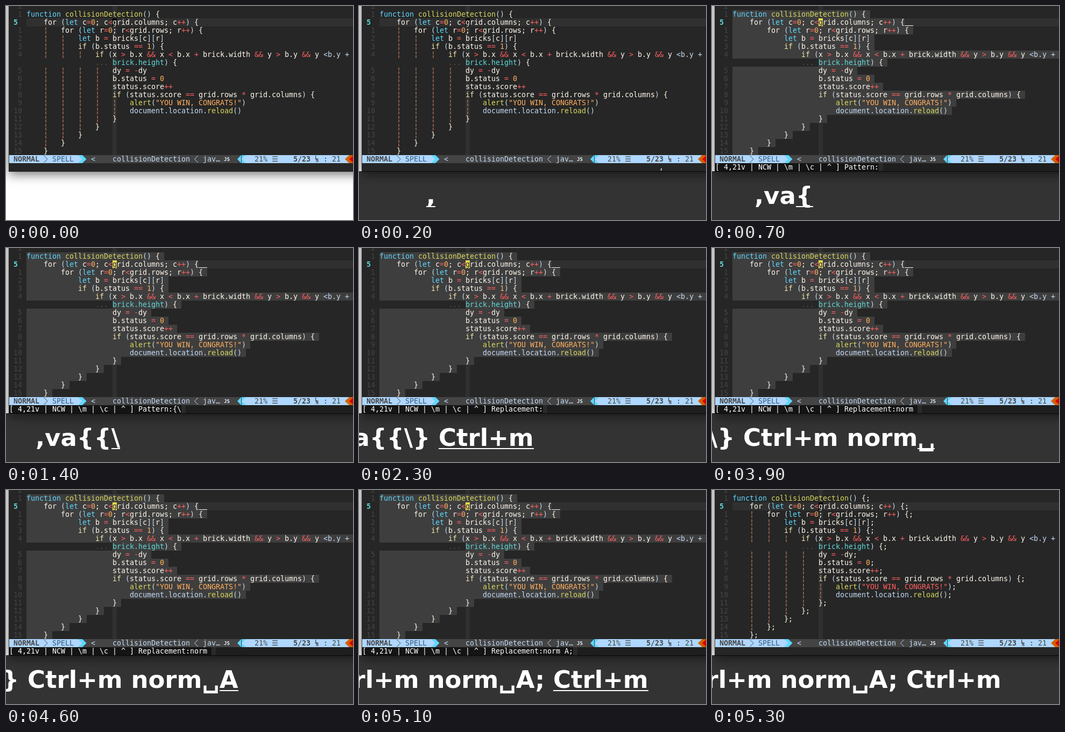
Animation, 645 px wide and 399 px high, one loop 6.5 s. Source, as an HTML page with a canvas:

```html
<!DOCTYPE html>
<html lang="en">
<head>
<meta charset="utf-8">
<title>Editing several lines at once</title>
<style>
html, body { margin: 0; width: 645px; height: 399px; overflow: hidden; background: #fff; }
canvas { display: block; }
</style>
</head>
<body>
<canvas id="stage" width="645" height="399"></canvas>
<script>
const ctx = document.getElementById('stage').getContext('2d');
const W = 645, H = 399, LOOP = 6500;
const CELL = 8, ROW = 15, LEFT = 6, TOP = 8, CODE = 38;
const MONO = '"DejaVu Sans Mono", monospace';
const FONT = '13.33px ' + MONO;
const BOLD = 'bold ' + FONT;
const KEYS = 'bold 45px "DejaVu Sans", sans-serif';

const C = {
  bg: '#262626', line: '#303030', sel: '#3e3e3e', num: '#444444', text: '#fff8ec',
  red: '#ff5f5f', orange: '#ffaf5f', cyan: '#5fd7ff', teal: '#5fd7d7', lime: '#d7d75f',
  pale: '#afd7ff', bar: '#d7875f', yellow: '#e8d84a', mid: '#444444', info: '#c2daf4',
  hot: '#d75f00', alarm: '#d70000'
};

// [number, indent, code]
const lines = [
  ['1', 0, 'function collisionDetection() {'],
  ['5', 4, 'for (let c=0; c<grid.columns; c++) {'],
  ['1', 8, 'for (let r=0; r<grid.rows; r++) {'],
  ['2', 12, 'let b = bricks[c][r]'],
  ['3', 12, 'if (b.status == 1) {'],
  ['4', 16, 'if (x > b.x && x < b.x + brick.width && y > b.y && y <b.y + '],
  ['', 20, 'brick.height) {'],
  ['5', 20, 'dy = -dy'],
  ['6', 20, 'b.status = 0'],
  ['7', 20, 'status.score++'],
  ['8', 20, 'if (status.score == grid.rows * grid.columns) {'],
  ['9', 24, 'alert("YOU WIN, CONGRATS!")'],
  ['10', 24, 'document.location.reload()'],
  ['11', 20, '}'], ['12', 16, '}'], ['13', 12, '}'], ['14', 8, '}'], ['15', 4, '}']
];
const WRAPPED = 5, REST = 6, CURSOR_COL = 20;

const TOKEN = /"[^"]*"|<b\.y \+|brick\.height|document\.location\.|\b(?:function|if|let|alert|reload|collisionDetection)\b|\b\d+\b|[=<>*+&-]+|[()\[\]]|\s+|[\w.]+|./g;

function colour(tok, done) {
  if (tok[0] === '"') return done ? C.red : C.orange;
  if (/^(let|function)$/.test(tok)) return C.cyan;
  if (/^(alert|reload|collisionDetection)$/.test(tok)) return C.lime;
  if (tok === 'if') return '#f4e8b0';
  if (tok === 'brick.height') return C.teal;
  if (/^(<b|document)/.test(tok)) return C.info;
  if (/^\d/.test(tok)) return C.orange;
  if (/^[=<>*+&-]/.test(tok)) return C.red;
  if (/^[()\[\]]/.test(tok)) return '#c6dcec';
  return C.text;
}

// Each step overrides part of the state before it.
const steps = [
  [0, { keys: '', mark: 0, show: '', prompt: null, match: false, done: false, panel: false }],
  [200, { keys: ',', mark: 1, show: ',', panel: true }],
  [300, { keys: ',v', show: ',v' }],
  [400, { mark: 0 }],
  [500, { keys: ',va', mark: 1, show: ',va' }],
  [600, { keys: ',va{', show: ',va{' }],
  [700, { show: '', prompt: 'Pattern:' }],
  [800, { keys: ',va{{' }],
  [900, { prompt: 'Pattern:{', match: true }],
  [1000, { mark: 0 }],
  [1400, { keys: ',va{{\\', mark: 1, prompt: 'Pattern:{\\', match: false }],
  [1600, { keys: ',va{{\\}', prompt: 'Pattern:{\\}' }],
  [1800, { mark: 0 }],
  [2300, { keys: ',va{{\\} Ctrl+m', mark: 6, prompt: 'Replacement:' }],
  [2400, { mark: 0 }],
  [3200, { keys: ',va{{\\} Ctrl+m norm', mark: 1, prompt: 'Replacement:norm' }],
  [3300, { mark: 0 }],
  [3900, { keys: ',va{{\\} Ctrl+m norm\u2423', mark: 1, prompt: 'Replacement:norm ' }],
  [4200, { mark: 0 }],
  [4600, { keys: ',va{{\\} Ctrl+m norm\u2423A', mark: 1 }],
  [4700, { mark: 0, prompt: 'Replacement:norm A' }],
  [4900, { keys: ',va{{\\} Ctrl+m norm\u2423A;', mark: 1 }],
  [5000, { prompt: 'Replacement:norm A;' }],
  [5100, { keys: ',va{{\\} Ctrl+m norm\u2423A; Ctrl+m', mark: 6 }],
  [5200, { prompt: null, done: true }],
  [5300, { mark: 0 }]
];

function stateAt(t) {
  const s = {};
  for (const [at, change] of steps) if (t >= at) Object.assign(s, change);
  return s;
}

function box(x, y, w, h, fill) {
  ctx.fillStyle = fill;
  ctx.fillRect(x, y, w, h);
}

function poly(fill, ...p) {
  ctx.fillStyle = fill;
  ctx.beginPath();
  for (let i = 0; i < p.length; i += 2) ctx.lineTo(p[i], p[i + 1]);
  ctx.fill();
}

function stroke(style, ...p) {
  ctx.strokeStyle = style;
  ctx.lineWidth = 1;
  ctx.beginPath();
  for (let i = 0; i < p.length; i += 2) ctx.lineTo(p[i], p[i + 1]);
  ctx.stroke();
}

function text(str, x, y, fill, font) {
  ctx.font = font;
  ctx.fillStyle = fill;
  ctx.fillText(str, x, y);
}

// Terminal text: one character per cell.
function type(str, x, y, fill, font = FONT) {
  [...str].forEach((ch, i) => text(ch, x + i * CELL, y, fill, font));
}

const rowTop = r => TOP + r * ROW;
const colX = c => CODE + c * CELL;

function drawWindow() {
  box(0, 0, W, H, '#fff');
  ctx.save();
  ctx.shadowColor = 'rgba(0,0,0,.58)';
  ctx.shadowBlur = 20;
  ctx.shadowOffsetY = 4;
  box(5, -60, W + 60, 369, C.bg);
  ctx.restore();
}

function drawLine(r, s) {
  const [num, indent, code] = lines[r];
  const y = rowTop(r), base = y + 12;
  const src = s.done && r !== WRAPPED ? code + ';' : code;
  const selected = s.prompt !== null;
  const end = indent + src.length;

  if (selected) {
    const from = r === REST ? indent : 0;
    box(colX(from), y, (end - from + (r === 1 ? 0 : 1)) * CELL, ROW, C.sel);
    if (r === 1) box(colX(end), y + 13, 2 * CELL, 1, '#fff');
  }
  if (r === 1) type(num, 14, base, C.teal, BOLD);
  else type(num, 30 - num.length * CELL, base, C.num);

  if (r === REST) type('...', colX(16), base, '#505050');
  else if (!selected) {
    for (let c = 4; c < indent; c += 4) type('\u00a6', colX(c), base, C.bar);
  }

  if (r === 1) box(colX(CURSOR_COL), y, CELL, ROW, selected ? C.yellow : '#000');

  let col = indent;
  for (const tok of src.match(TOKEN)) {
    const hit = s.match && tok === '{';
    if (hit) box(colX(col), y, CELL, ROW, C.yellow);
    type(tok, colX(col), base, hit ? C.bg : colour(tok, s.done));
    if (r === 1 && col === CURSOR_COL && selected) type(tok[0], colX(col), base, C.bg);
    col += tok.length;
  }
}

function drawStatus() {
  const y = rowTop(18), m = y + 7.5, b = y + ROW, base = y + 12;
  const dark = '#444444';
  box(5, y, W, ROW, C.mid);

  box(6, y, 128, ROW, C.pale);
  box(134, y, 8, ROW, C.cyan);
  poly(C.cyan, 142, y, 149.5, m, 142, b);
  poly(C.pale, 134, y, 141.5, m, 134, b);
  type('NORMAL', 14, base, dark, BOLD);
  stroke(dark, 70.5, y + 1, 77, m, 70.5, b - 1);
  type('SPELL', 86, base, '#3a5a7a');

  type('<', 158, base, C.info);
  type('collisionDetection', 198, base, C.info);
  stroke(C.info, 357, y + 1, 350.5, m, 357, b - 1);
  type('jav\u2026', 366, base, C.info);
  text('JS', 405, base - 1, '#e8f2ff', 'bold 9px ' + MONO);

  poly(C.cyan, 437, y, 430, m, 437, b);
  box(438, y, 192, ROW, C.pale);
  poly(C.cyan, 438, y, 446, y, 438, m, 446, b, 438, b);
  type('21% \u2630', 462, base, dark);
  type('5/23', 534, base, dark, BOLD);
  text('L', 574, y + 8, dark, 'bold 9px ' + MONO);
  text('N', 576, y + 13, dark, 'bold 8px ' + MONO);
  type(': 21', 590, base, dark);
  box(630, y, 8, ROW, C.pale);
  poly(C.hot, 638, y, 630, m, 638, b);
  box(638, y, 7, ROW, C.hot);
  poly(C.alarm, 646, y, 638, m, 646, b);
}

function drawPrompt(s) {
  const y = rowTop(19), base = y + 12;
  if (s.prompt !== null) {
    const str = '[ 4,21v | NCW | \\m | \\c | ^ ] ' + s.prompt;
    const end = LEFT + str.length * CELL;
    box(LEFT, y, W, ROW, '#1e1e1e');
    box(LEFT, y, end - LEFT, ROW, '#141414');
    box(end, y, CELL, ROW, '#2a2a2a');
    type(str, LEFT, base, '#ffffff');
  }
  if (s.show) type(s.show, 558, base, C.text);
}

function drawKeys(s) {
  if (!s.panel) return;
  box(0, 308, W, H - 308, 'rgba(0,0,0,.8)');
  ctx.font = KEYS;
  const width = ctx.measureText(s.keys).width;
  const x = Math.round(133.4 - width / 2);
  text(s.keys, x, 369, '#fff', KEYS);
  if (s.mark) {
    const w = ctx.measureText(s.keys.slice(-s.mark)).width;
    box(Math.round(x + width - w), 373, Math.round(w), 2, '#fff');
  }
}

function draw(t) {
  const s = stateAt(t);
  drawWindow();
  box(colX(CURSOR_COL), 0, CELL, rowTop(18), C.line);
  box(CODE, rowTop(1), W, ROW, C.line);
  type('2', 22, rowTop(-1) + 12, C.num);
  lines.forEach((_, r) => drawLine(r, s));
  drawStatus();
  drawPrompt(s);
  drawKeys(s);
}

const start = performance.now();
function tick() {
  draw((performance.now() - start) % LOOP);
  requestAnimationFrame(tick);
}
tick();
</script>
</body>
</html>
```
